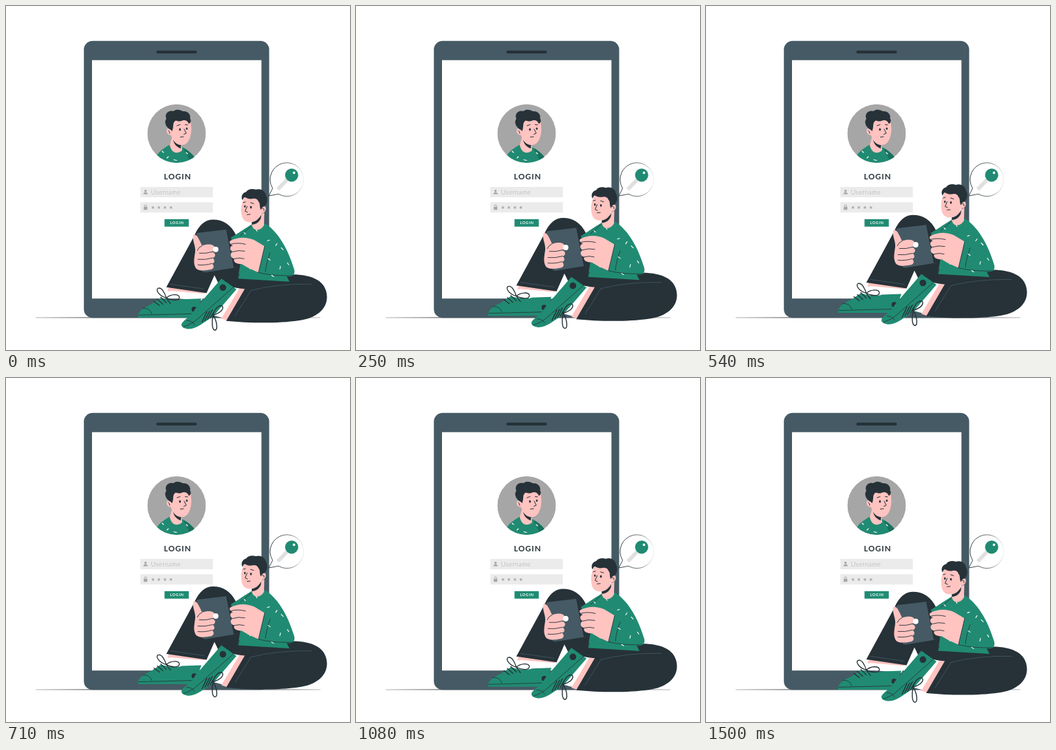
Write an HTML page that moves like this. It is 500x500 px and loops after 1540 ms.

```html
<!DOCTYPE html>
<html lang="en">
<head>
<meta charset="utf-8">
<title>Login</title>
<style>
  html, body { margin: 0; width: 100%; height: 100%; overflow: hidden; background: #fff; }
  svg { display: block; width: 100vw; height: 100vh; }
  text { font-family: Lato, sans-serif; }
  .green { fill: #208b72; }
  .dark { fill: #263238; }
  .slate { fill: #455a64; }
  .skin { fill: #ffc3c0; }
  .white { fill: #fff; }
  .field { fill: #ebebeb; }
  .grey { fill: #a6a6a6; }
  .line { fill: none; stroke: #263238; stroke-linecap: round; stroke-linejoin: round; }
  .seam { stroke: #455a64; stroke-width: .8; }
  .fleck { fill: none; stroke: #fff; stroke-width: 1.1; stroke-linecap: round; }
</style>
</head>
<body>
<svg viewBox="0 0 500 500">
  <defs>
    <clipPath id="portrait"><circle cx="248" cy="185.3" r="42.6"/></clipPath>
    <linearGradient id="fade">
      <stop offset=".1" stop-color="#263238"/>
      <stop offset=".6" stop-color="#263238" stop-opacity=".7"/>
      <stop offset="1" stop-color="#263238" stop-opacity=".08"/>
    </linearGradient>
    <path id="star" d="M0-2.1V2.1M-1.9-1L1.9 1M-1.9 1L1.9-1" stroke="#a6a6a6" stroke-width=".9"/>
  </defs>

  <path d="M43 452.8L115 452.3H382L457 452.8V453.2L382 453.6H115L43 453.2Z" fill="#777"/>

  <!-- tablet screen -->
  <rect class="slate" x="113.2" y="50.8" width="269.3" height="402.4" rx="12.5"/>
  <rect class="white" x="125" y="78.7" width="246.3" height="346.5"/>
  <rect class="dark" x="218.5" y="64.7" width="59" height="4.4" rx="2.2"/>

  <!-- portrait -->
  <g clip-path="url(#portrait)">
    <circle class="grey" cx="248" cy="185.3" r="42.6"/>
    <path class="green" d="M215 230L220 216C225 209 232 205 239 201L258 206C266 210 272 217 276 222V230Z"/>
    <path d="M258 207C266 210 272 217 276 222V230H270Z" fill="#19705c"/>
    <path class="skin" d="M242 188L238 202C240 212 247 217 256 210L255 198Z"/>
    <path class="dark" d="M242.5 193C245 199 249 201.5 254.5 202L254 207C248 205 244 201 242.5 193Z"/>
    <path class="skin" d="M240 168L238 178C232 176 231 187 240 188C242 196 248 202 256 202C265 202 269 191 269.5 179L268 163L252 158Z"/>
    <path class="dark" d="M239.5 180C233 177 229 169 233 164C230 157 236 151 243 153C248 149 254 151 257 153C265 152 269 159 267.5 163C270 167 268 171 265.5 171C264 166 259 165 255 167C250 169 247 165 245 168C242 171 244 176 241.5 182Z"/>
    <ellipse class="dark" cx="252.8" cy="179.5" rx="1.3" ry="1.9"/>
    <ellipse class="dark" cx="262.8" cy="178.3" rx="1.2" ry="1.8"/>
    <path class="line" stroke-width="1" d="M248.5 174L253 172.4M260.5 172.5L264 172.8M259 179L262 185L258.5 186.5M253.5 190.5L258 190M236 181Q238 182 238 185"/>
    <path class="fleck" d="M227 211L229 213M244 223.5L248 224.5M262 213L264 215M234 221L236 219"/>
  </g>

  <!-- form -->
  <text class="dark" x="229.4" y="251.7" font-size="11.4" font-weight="700" letter-spacing=".95">LOGIN</text>
  <rect class="field" x="195.3" y="263" width="105.4" height="15"/>
  <rect class="field" x="195.3" y="285.2" width="105.4" height="15"/>
  <circle class="grey" cx="202.8" cy="268.7" r="1.7"/>
  <path class="grey" d="M199.7 273.4C199.7 270 206 270 206 273.4Z"/>
  <text class="grey" x="210.7" y="273.6" font-size="9" font-weight="300" letter-spacing=".55">Username</text>
  <rect class="grey" x="200.2" y="292" width="5.2" height="4.3" rx=".6"/>
  <path d="M201.3 292V290.5A1.5 1.5 0 0 1 204.3 290.5V292" fill="none" stroke="#a6a6a6"/>
  <use href="#star" x="213.6" y="292.9"/><use href="#star" x="222.2" y="292.9"/>
  <use href="#star" x="231" y="292.9"/><use href="#star" x="239.7" y="292.9"/>
  <rect class="green" x="230.4" y="309.8" width="35.3" height="10.9"/>
  <text class="white" x="238.4" y="317.1" font-size="5.4" font-weight="700" letter-spacing=".7">LOGIN</text>

  <!-- speech bubble -->
  <path d="M382 276L387.5 265A24.4 24.4 0 1 1 396 273.3Z" fill="#fff" stroke="url(#fade)" stroke-width=".9" stroke-linejoin="round"/>
  <path d="M410 251L395 266.5" stroke="#e0e0e0" stroke-width="5.4"/>
  <circle class="green" cx="415.2" cy="245.8" r="9.6"/>
  <circle class="white" cx="418.6" cy="242.4" r="1.8"/>

  <g id="person">
    <!-- far leg and shoe -->
    <path class="skin" d="M237 408L234.5 414L285 420L292 415Z"/>
    <path class="white" d="M238 413.5L290 418L284 428L240 424Z"/>
    <path class="green" d="M192 452.5C191 444 200 438 210 434L225 424C234 427 247 429 256 426L284 425L274 452.5Z"/>
    <path class="line" stroke-width=".8" d="M193 449L274 447M199 439Q209 438 212 447"/>
    <circle class="dark" cx="273.5" cy="440.5" r="3.8"/>
    <path class="line" stroke-width="1.3" d="M233 424C222 421 217 412 221 410C227 408 231 418 233 424C240 418 251 418 252 423C252 429 240 428 233 424M233 424L239 432M220 426L228 433M225 423L233 431M215 429L223 435"/>
    <path class="dark" d="M233 408.5L273.5 334C281 317 290 310.3 301 310.3C315 310.3 327 317 335 334L352 404L312 410L303 391L291.5 417Z"/>
    <path class="line seam" d="M239 404L288 411"/>

    <!-- near leg and shoe -->
    <path class="white" d="M312 398L344 409L322 455L300 449Z"/>
    <path class="skin" d="M340 409L349 409L325 458L313 454Z"/>
    <path class="dark" d="M303 391C309 401 321 409 347 411L320 457.5C355 461 397 461 425 457C451 454 467 440 466.5 422C466 400 446 390 416 390L340 392Z"/>
    <path class="line seam" d="M356 413L333 450M356 413Q395 403 444 404"/>
    <path class="green" d="M255 463C256 457 269 451 275 440L313 396L335 411.5L301 451C288 459 275 471 263 469C258 468 255 466 255 463Z"/>
    <path class="line" stroke-width=".8" d="M258 466Q271 462 280 453L331 408M263 457Q271 457 274 463"/>
    <circle class="dark" cx="315.3" cy="409" r="4.8"/>
    <path class="line" stroke-width="1.4" d="M301 449C303 438 313 432 315 437C316 443 307 447 301 449C307 458 308 470 304 471C299 471 299 458 301 449M285 459L292 444M289 457L296 443M293 455L300 441M297 453L303 443"/>

    <!-- torso -->
    <path class="green" d="M326 337C339 329 349 322 358 316.5L377 316C397 329 411 356 419 383C421 392 414 394 408 392.5L412 400.5L337 396L341 372Z"/>
    <path class="line" stroke-width=".8" d="M367 387C382 391 399 392 416 391.5M384 358Q379 370 377 386M341 333L356 320M339 389L337 396"/>
    <path class="fleck" d="M346 329L348 331M363 324L365 327M387 321L388 324M380 341L383 340M394 345L392 348M381 367L384 369M400 351L403 354M399 378L398 382M409 373L411 376M353 379L355 382M386 391L389 393"/>

    <!-- head -->
    <path class="skin" d="M358 308L357.5 318C359 328 371 327 375 318L375.5 300Z"/>
    <path class="dark" d="M357 314C363 313 368 309 371 303L370.5 308C368 314 363 317.5 357.5 317.5Z"/>
    <path class="skin" d="M346 276L342 291C341 305 344 313 353 314C361 314 368 308 370 301C378 302 380 292 375 290L372 277Z"/>
    <path class="dark" d="M343.5 282C341 276 344 271 349 270C352 265 359 265 363 266.5C371 264 377 269 378 275C381 280 380 287 376 291C373 291 372 293 370.5 296C368 292 370 287 367 284C365 279 361 279 357 280C351 281 348 277 346 278Z"/>
    <ellipse class="dark" cx="347.2" cy="291" rx="1.2" ry="1.8"/>
    <ellipse class="dark" cx="356" cy="292.2" rx="1.3" ry="1.9"/>
    <path class="line" stroke-width="1" d="M344.8 285.5L348 284.5M355.5 285.5L360 287M350.5 291L347.5 298L351 299.5M350.5 303L355 302.5M372.5 294Q375.5 293 375 297"/>

    <!-- held device and hands -->
    <path class="slate" d="M279 329.5L321 324.5Q324 324.5 325 327L335 376Q335.5 379 333 380L290 387Q286 387 285 384L276.5 333Q276 330 279 329.5Z"/>
    <path class="dark" d="M321 324.5Q324 324.5 325 327L335 376Q335.5 379 333 380L331 380L320 324.7Z"/>
    <path class="skin" d="M273 332C278 331 281 340 285 348C294 345 303 346 303 351C304 356 299 357 299 357C306 359 305 365 300 366C304 368 304 374 299 374C304 377 302 383 296 383C287 385 277 385 275 379C272 373 274 364 275 357C276 349 271 342 272 334Z"/>
    <circle class="white" cx="304.8" cy="353.4" r="4"/>
    <path class="line" stroke-width=".9" d="M285 348Q280 350 278 355M281 359Q291 360 300 357M279 368Q290 369 300 366M279 376Q290 377 299 374"/>
    <path class="skin" d="M326 341C337 335 350 335 361 340L376 349L367 387C355 382 349 379 343 375C336 375 329 372 332 367C326 366 325 360 329 357C324 353 326 348 330 348C325 346 324 343 326 341Z"/>
    <path class="line" stroke-width=".9" d="M326 346Q337 343 348 346M329 357Q338 354 347 356M332 367Q339 365 346 367M376 349L367 387"/>
  </g>
</svg>
<script>
  const PERIOD = 1540, LOWEST = 1480, BASE = .4, LIFT = 7.8;
  const person = document.getElementById("person");

  function draw(now) {
    const phase = (now - LOWEST) / PERIOD * 2 * Math.PI;
    const y = BASE - LIFT * (1 - Math.cos(phase)) / 2;
    person.setAttribute("transform", `translate(0 ${y.toFixed(3)})`);
  }

  const start = performance.now();
  function tick() {
    draw(performance.now() - start);
    requestAnimationFrame(tick);
  }
  tick();
</script>
</body>
</html>
```
